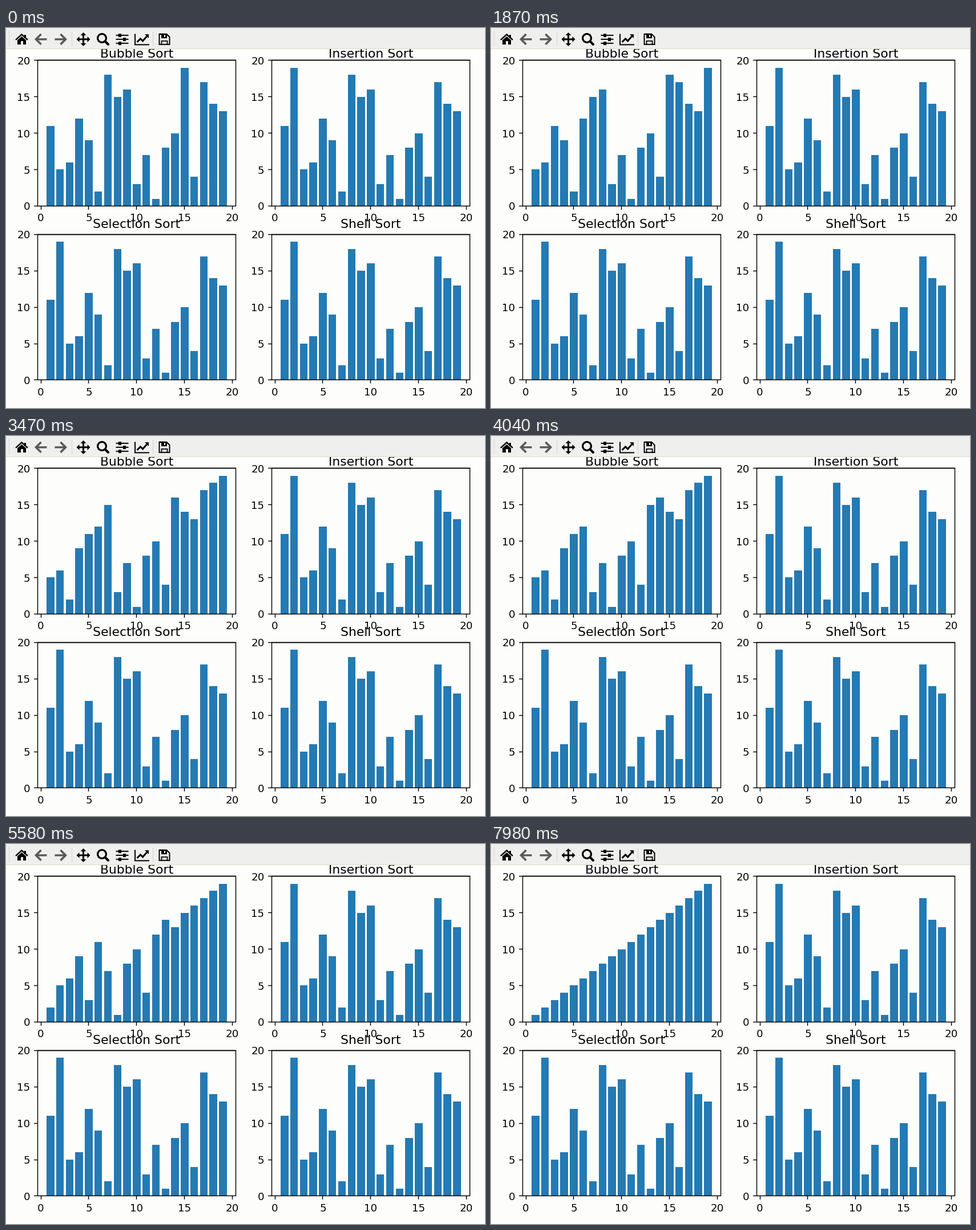
A matplotlib script that plays this animation: 839x667 px, repeating every 8000 ms.

```python
import math
import numpy as np
import matplotlib.pyplot as plt
from matplotlib.animation import FuncAnimation
from matplotlib.collections import LineCollection, PolyCollection
from matplotlib.patches import Circle, Polygon, Rectangle

W, H, DPI = 839, 667, 128
PX = 72 / DPI                      # one pixel, in figure points
PT = 131 / 72                      # one chart point, in pixels
FRAMES, STEP = 250, 32

PAPER, BAR, INK = "#fdfdfc", "#247ab3", "black"
TOOLBAR, EDGE, DOTS, GREY = "#efefee", "#dcdcc6", "#bcbcb8", "#595959"

PANEL_W, PANEL_H = 347.2, 255.6
MARGIN = 0.34                      # space left of x = 0, in bar units
UNIT_X, UNIT_Y = PANEL_W / (20 + 2 * MARGIN), PANEL_H / 20

START = [11, 19, 5, 6, 12, 9, 2, 18, 15, 16, 3, 7, 1, 8, 10, 4, 17, 14, 13]
FIRST_SWAPS = 13                   # swaps already made when the loop opens

plt.rcParams["font.family"] = "DejaVu Sans"
fig = plt.figure(figsize=(W / DPI, H / DPI), dpi=DPI, facecolor=PAPER)
ax = fig.add_axes([0, 0, 1, 1])
ax.set_xlim(0, W)
ax.set_ylim(H, 0)
ax.axis("off")


def bubble_states(values):
    """Every arrangement of the list, one per swap."""
    a = list(values)
    states = [a[:]]
    for end in range(len(a) - 1, 0, -1):
        for j in range(end):
            if a[j] > a[j + 1]:
                a[j], a[j + 1] = a[j + 1], a[j]
                states.append(a[:])
    return states


def crisp(v):
    """Centre of the pixel that holds v."""
    return math.floor(v) + 0.5


def rect(x0, y0, x1, y1):
    return [(x0, y0), (x1, y0), (x1, y1), (x0, y1)]


def bar_verts(left, bottom, values):
    verts = []
    for i, v in enumerate(values, 1):
        mid = left + (i + MARGIN) * UNIT_X
        verts.append(rect(round(mid - 0.4 * UNIT_X), round(bottom - v * UNIT_Y),
                          round(mid + 0.4 * UNIT_X), round(bottom)))
    return verts


def panel(left, top, title, baseline):
    bottom = top + PANEL_H
    bars = PolyCollection(bar_verts(left, bottom, START),
                          facecolors=BAR, linewidths=0, zorder=2)
    ax.add_collection(bars)

    x0, x1 = crisp(left), crisp(left + PANEL_W)
    y0, y1 = crisp(top), crisp(bottom)
    frame = rect(x0, y0, x1, y1)
    lines = [frame + frame[:2]]
    tick, gap = 3.5 * PT, 7 * PT
    font = dict(size=10 * PT * PX)
    for v in range(0, 21, 5):
        x, y = left + (v + MARGIN) * UNIT_X, bottom - v * UNIT_Y
        lines.append([(crisp(x), y1), (crisp(x), y1 + tick)])
        lines.append([(x0, crisp(y)), (x0 - tick, crisp(y))])
        ax.text(x, bottom + gap, str(v), ha="center", va="top", **font)
        ax.text(left - gap, y, str(v), ha="right", va="center_baseline", **font)
    ax.add_collection(LineCollection(lines, colors=INK, linewidths=0.8 * PT * PX,
                                     capstyle="butt", joinstyle="miter",
                                     snap=False, zorder=3))
    ax.text(left + PANEL_W / 2, baseline, title, size=12 * PT * PX,
            ha="center", va="baseline", zorder=4)
    return bars


def stroke(points, width, color=INK, style="-", cap="butt"):
    xs, ys = zip(*points)
    ax.plot(xs, ys, color=color, lw=width * PX, ls=style, zorder=7, snap=False,
            solid_capstyle=cap, solid_joinstyle="miter")


def fill(points, color=INK):
    ax.add_patch(Polygon(points, facecolor=color, lw=0, zorder=7))


def home(x, y):
    stroke([(x - 10.5, y + 1), (x, y - 8.5), (x + 10.5, y + 1)], 2.4)
    fill(rect(x + 4.5, y - 8, x + 7.5, y - 2))
    fill([(x - 7.5, y + 1.5), (x, y - 5), (x + 7.5, y + 1.5)])
    for d in (-1, 1):
        fill(rect(x + 2 * d, y + 1, x + 7.5 * d, y + 9))
    fill(rect(x - 3, y, x + 3, y + 3))


def arrow(x, y, d):
    stroke([(x - 9 * d, y), (x + 10 * d, y)], 3.4, GREY)
    stroke([(x, y - 9), (x - 9 * d, y), (x, y + 9)], 3.6, GREY)


def pan(x, y):
    for k in range(4):
        c, s = round(math.cos(k * math.pi / 2)), round(math.sin(k * math.pi / 2))
        stroke([(x, y), (x + 8 * c, y + 8 * s)], 3)
        fill([(x + 12 * c, y + 12 * s),
              (x + 7 * c - 5 * s, y + 7 * s + 5 * c),
              (x + 7 * c + 5 * s, y + 7 * s - 5 * c)])


def zoom(x, y):
    ax.add_patch(Circle((x - 1.5, y - 2), 7.4, fill=False, ec=INK,
                        lw=3.2 * PX, zorder=7))
    stroke([(x + 4, y + 3.5), (x + 9.5, y + 9)], 4.2, cap="round")


def sliders(x, y):
    for k in (-1, 0, 1):
        row, knob = y + 7 * k, x + 4 - 8 * abs(k)
        stroke([(x - 11, row), (x + 11, row)], 2)
        fill(rect(knob - 2.5, row - 3, knob + 2.5, row + 3))


def chart(x, y):
    stroke([(x - 11.5, y - 9.5), (x - 11.5, y + 9.5), (x + 13.5, y + 9.5)], 2)
    stroke([(x - 8, y + 5), (x - 2, y - 1), (x + 2, y + 3), (x + 9, y - 5)], 3)
    fill([(x + 5, y - 9), (x + 12, y - 9), (x + 12, y - 2)])


def save(x, y):
    r = 9
    outline = [(x - r, y - r), (x + r - 5, y - r), (x + r, y - r + 5),
               (x + r, y + r), (x - r, y + r)]
    stroke(outline + outline[:2], 2)
    stroke(rect(x - 5, y + r, x + 5, y + 3)[:1]
           + rect(x - 5, y + 3, x + 5, y + r)[:3], 1.8)
    fill(rect(x - 5.5, y - r, x + 4, y - 2))
    fill(rect(x - 0.5, y - 8, x + 1.5, y - 4), TOOLBAR)


def dotted(x, y0):
    stroke([(x, y0), (x, 33)], 1.2, DOTS, (0, (1, 1.4)))


def toolbar():
    ax.add_patch(Rectangle((0, 0), W, 36, facecolor=TOOLBAR, lw=0, zorder=6))
    ax.add_patch(Rectangle((0, 36), W, 1, facecolor=EDGE, lw=0, zorder=6))
    dotted(5.5, 5)
    groups = [[home, lambda x, y: arrow(x, y, 1), lambda x, y: arrow(x, y, -1)],
              [pan, zoom, sliders, chart], [save]]
    x = 27.5
    for g, group in enumerate(groups):
        if g:
            x += 6
            dotted(x - 20, 7)
        for icon in group:
            icon(x, 19.8)
            x += 34


LEFT, RIGHT, UPPER, LOWER = 55.3, 465.3, 56.8, 362.3
bubble = panel(LEFT, UPPER, "Bubble Sort", 52)
panel(RIGHT, UPPER, "Insertion Sort", 52)
panel(LEFT, LOWER, "Selection Sort", 351)
panel(RIGHT, LOWER, "Shell Sort", 351)
toolbar()

states = bubble_states(START)[FIRST_SWAPS:]
count = np.arange(1, len(states))
swap_times = 113.7 * count - 0.04 * count ** 2   # swaps speed up slightly


def draw(i):
    done = np.searchsorted(swap_times, i * STEP + STEP / 2, side="right")
    bubble.set_verts(bar_verts(LEFT, UPPER + PANEL_H, states[done]))
    return [bubble]


anim = FuncAnimation(fig, draw, frames=FRAMES, init_func=lambda: draw(0),
                     interval=STEP, repeat=True, repeat_delay=0, blit=False)
plt.show()
```
